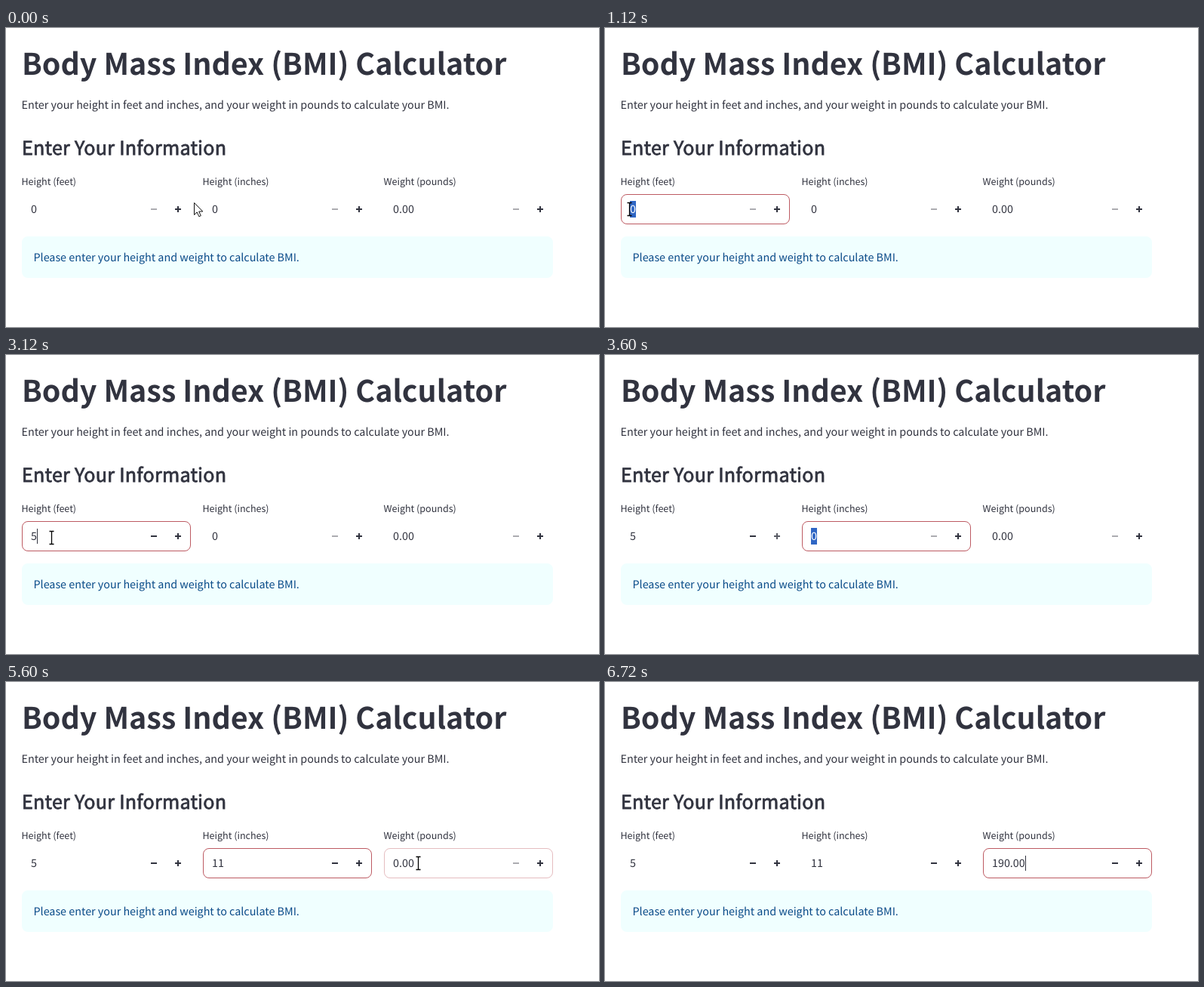
Animation of 786 by 396 pixels, one loop 7.28 s. Source, as an HTML page:

```html
<!DOCTYPE html>
<html lang="en">
<head>
<meta charset="utf-8">
<title>BMI Calculator</title>
<style>
  html, body { margin: 0; width: 100%; height: 100%; overflow: hidden; background: #fff; }
  svg { display: block; }
  text {
    font: 14.33px "Noto Sans CJK JP", "Noto Sans CJK SC", "Noto Sans CJK", "Noto Sans", sans-serif;
    fill: #31333f;
    font-kerning: normal;
    text-rendering: geometricPrecision;
  }
  .title { font-size: 39.4px; font-weight: 700; }
  /* Regular weight thickened to a semi-bold */
  .heading { font-size: 25.1px; letter-spacing: .01em; stroke: #31333f; stroke-width: .8px; }
  .label { font-size: 12.54px; }
  .notice { fill: #0a4a88; }
</style>
</head>
<body>
<svg id="stage" width="786" height="396" viewBox="0 0 786 396">
  <text class="title" x="21" y="62">Body Mass Index (BMI) Calculator</text>
  <text x="20.5" y="107">Enter your height in feet and inches, and your weight in pounds to calculate your BMI.</text>
  <text class="heading" x="21" y="168">Enter Your Information</text>
  <rect x="21" y="276" width="704" height="55" rx="8" fill="#f0ffff"/>
  <text class="notice" x="36.5" y="309">Please enter your height and weight to calculate BMI.</text>
</svg>
<script>
const LOOP = 7280, STEP = 80, INK = "#31333f";
const stage = document.getElementById("stage");

function add(tag, attrs, parent = stage) {
  const node = document.createElementNS("http://www.w3.org/2000/svg", tag);
  return parent.appendChild(set(node, attrs));
}
function set(node, attrs) {
  for (const key in attrs) node.setAttribute(key, attrs[key]);
  return node;
}
const clamp = v => Math.max(0, Math.min(1, v));

// values: [time, text]; focus, select: [from, to]; caret: visible spans
const fields = [
  { x: 21, label: "Height (feet)", values: [[0, "0"], [1200, "5"]], enabled: 1520,
    focus: [880, 3360], select: [1040, 1200], caret: [[1200, 2240], [2880, 3360]] },
  { x: 261, label: "Height (inches)", values: [[0, "0"], [3840, "1"], [4000, "11"]], enabled: 4880,
    focus: [3360, 5600], select: [3520, 3840], caret: [[3840, 5600]] },
  { x: 501, label: "Weight (pounds)",
    values: [[0, "0.00"], [6080, "1"], [6160, "19"], [6240, "190"], [6480, "190.00"]], enabled: 6480,
    focus: [5600, 7280], select: [5840, 6080], caret: [[6080, 6480], [6720, 7280]] }
].map(makeField);

function makeField(f) {
  add("text", { class: "label", x: f.x - .5, y: 208 }).textContent = f.label;
  f.border = add("rect", { x: f.x + .5, y: 220.5, width: 223, height: 39, rx: 7.5, fill: "none", stroke: "#bd5a62" });
  f.mark = add("rect", { x: f.x + 12, y: 229, height: 22, fill: "#2f66c4" });
  f.text = add("text", { x: f.x + 12, y: 245 });
  f.bar = add("rect", { y: 230, width: 1, height: 20, fill: INK });
  f.minus = add("path", { d: `M${f.x + 171} 240h8`, stroke: INK, "stroke-width": 2 });
  f.plus = add("path", { d: `M${f.x + 203} 240h8m-4-4v8`, stroke: INK, "stroke-width": 2, fill: "none" });
  return f;
}

const arrow = add("path", { d: "M.5.5v16l3.7-3.6 2.6 5.8 2.5-1.1-2.6-5.6h5.1z", fill: "#fff", stroke: "#111" });
const beam = add("path", { d: "M-3-8.5h2.5l.5.5.5-.5H3M0-8V8M-3 8.5h2.5L0 8l.5.5H3", fill: "none", stroke: "#000", "stroke-width": 1.3 });

// Pointer trips: [time, x, y]
const trips = [
  [[0, 249, 231], [80, 249, 231], [400, 229, 238], [560, 222, 239], [720, 168, 240], [880, 48, 240], [1040, 32, 240], [1200, 32, 240]],
  [[3120, 60, 242], [3360, 286, 240], [3520, 272, 240]],
  [[5280, 300, 243], [5600, 546, 240], [5840, 508, 241], [6000, 463, 241], [6080, 463, 241]]
];

function pointerAt(t) {
  const trip = trips.find(p => t >= p[0][0] && t < p[p.length - 1][0]);
  if (!trip) return null;
  const i = trip.findIndex(p => p[0] > t);
  const [t0, x0, y0] = trip[i - 1], [t1, x1, y1] = trip[i];
  const k = (t - t0) / (t1 - t0);
  return { x: Math.round(x0 + (x1 - x0) * k), y: Math.round(y0 + (y1 - y0) * k) };
}

function drawField(f, t) {
  const within = ([from, to]) => t >= from && t < to;
  const show = (node, on) => node.setAttribute("visibility", on ? "visible" : "hidden");
  const selected = within(f.select);
  f.text.textContent = f.values.filter(v => v[0] <= t).pop()[1];
  f.text.style.fill = selected ? "#fff" : INK;
  const width = f.text.getComputedTextLength();
  set(f.mark, { width: Math.round(width) });
  show(f.mark, selected);
  set(f.bar, { x: Math.round(f.x + 12.5 + width) });
  show(f.bar, f.caret.some(within));
  const fadeIn = clamp((t - f.focus[0] + STEP) / 200);
  const fadeOut = clamp((t - f.focus[1]) / 200);
  set(f.border, { opacity: fadeIn * (1 - fadeOut) });
  set(f.minus, { opacity: .4 + .6 * clamp((t - f.enabled + STEP) / 160) });
}

function draw(now) {
  const t = Math.floor(now % LOOP / STEP) * STEP;
  fields.forEach(f => drawField(f, t));
  set(fields[0].plus, { opacity: t >= 400 && t < 880 ? .6 : t >= 3280 && t < 3680 ? .8 : 1 });
  const p = pointerAt(t);
  const overText = p && p.y > 220 && fields.some(f => p.x > f.x && p.x < f.x + 160);
  set(arrow, { visibility: p && !overText ? "visible" : "hidden" });
  set(beam, { visibility: overText ? "visible" : "hidden" });
  if (p) {
    set(arrow, { transform: `translate(${p.x} ${p.y})` });
    set(beam, { transform: `translate(${p.x + .5} ${p.y})` });
  }
}

const start = performance.now();
function tick() {
  draw(performance.now() - start);
  requestAnimationFrame(tick);
}
tick();
</script>
</body>
</html>
```
